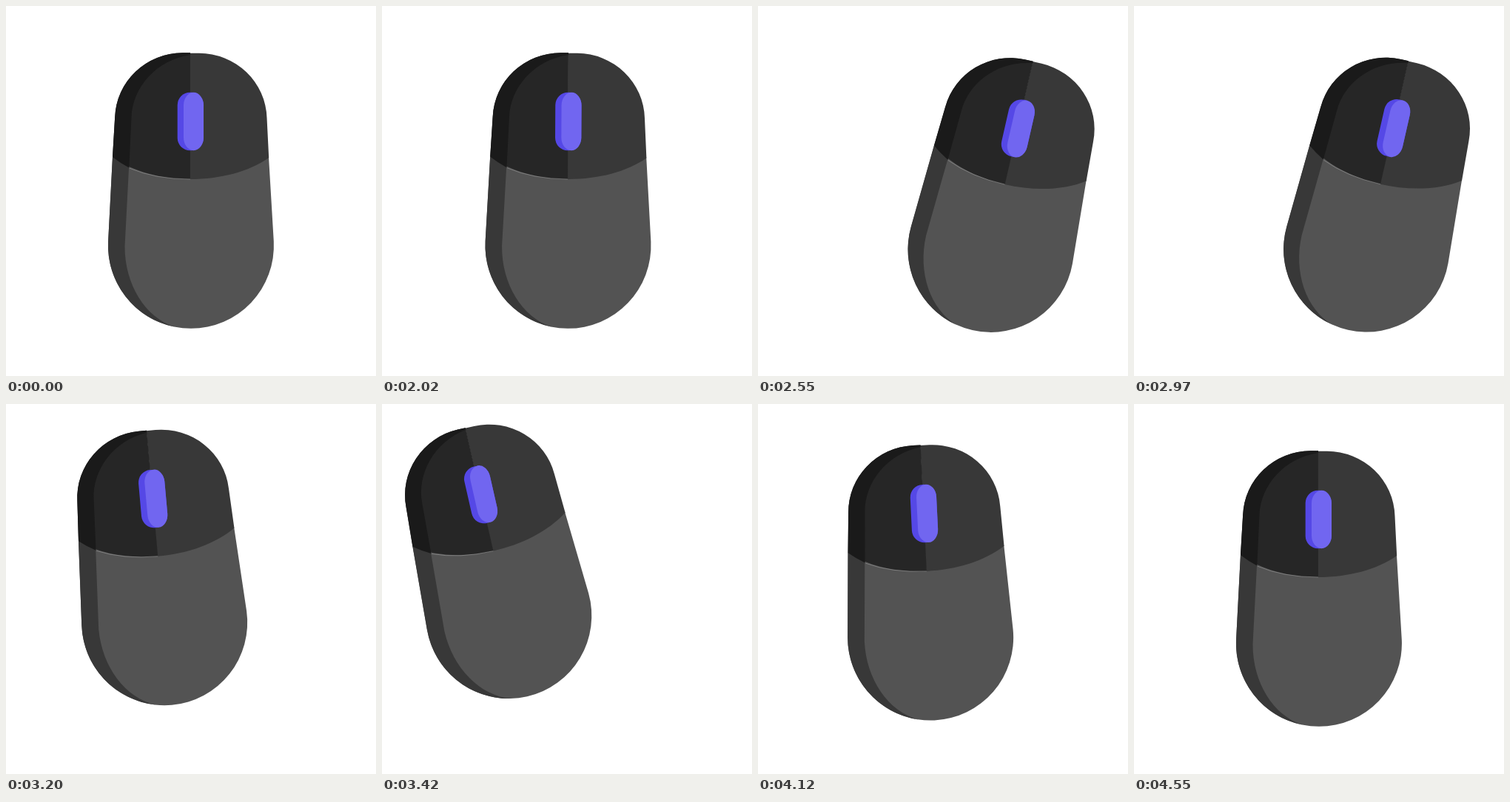
Write an HTML page that moves like this. It is 500x500 px and loops after 4.57 s.

```html
<!DOCTYPE html>
<html lang="en">
<head>
<meta charset="utf-8">
<title>Computer mouse</title>
<style>
  html, body { margin: 0; width: 100%; height: 100%; overflow: hidden; background: #fff; }
  svg { display: block; width: 100%; height: 100%; }
</style>
</head>
<body>
<svg viewBox="0 0 500 500">
  <g id="mouse">
    <path fill="#535353" d="M144 204 L138.1 318 A112 112 0 1 0 361.8 318 L355 204 L249 190 Z"/>
    <path fill="#383838" d="M144 204 L138.1 318 A112 112 0 0 0 228 433.7 C188 421 160.5 376 160.5 325 L166.5 210 Z"/>
    <path fill="#383838" d="M248.5 63.7 H261 A92 90 0 0 1 352.5 151 L355.2 205 C328 224 290 234 248.5 234 Z"/>
    <path fill="#262626" d="M249 63.3 H238.5 A92 90 0 0 0 147.2 150 L144 204 C172 224 210 234 249 234 Z"/>
    <path fill="#1a1a1a" d="M249 63.3 H238.5 A92 90 0 0 0 147.2 150 L144 204 Q154 212 166.3 218.6 L169.5 150 C171 110 203 73 249 66 Z"/>
    <path fill="none" stroke="#a8a8a8" stroke-width=".5" d="M167 219.2 Q202 234 249 234"/>
    <rect x="231.7" y="116.8" width="35.3" height="78.4" rx="17" fill="#5548e6"/>
    <rect x="240" y="116.8" width="27" height="78.4" rx="13.4" ry="17.5" fill="#7166f0"/>
  </g>
</svg>
<script>
  const LOOP = 4570;
  const mouse = document.getElementById('mouse');

  // Poses: shift x, shift y, angle about the bottom middle of the stage.
  const right = [25.7, 0.7, 13];
  const left = [-45.4, -46, -15.1];

  // Cubic bezier easing with handles (x1, 0) and (x2, 1).
  function ease(u, x1, x2) {
    if (u <= 0) return 0;
    if (u >= 1) return 1;
    let low = 0, high = 1, s;
    for (let i = 0; i < 24; i++) {
      s = (low + high) / 2;
      const r = 1 - s;
      const x = 3 * x1 * s * r * r + 3 * x2 * s * s * r + s ** 3;
      if (x < u) low = s; else high = s;
    }
    return s * s * (3 - 2 * s);
  }

  // Quick start with a long, slow settling.
  const settle = t => t <= 0 ? 0 : 1 / (1 + (92 / t) ** 2.52);

  function draw(t) {
    const toRight = settle(t - 2000);
    const toLeft = ease((t - 2941) / 789, 0.292, 0.074);
    const home = ease((t - 3852) / 590, 0.333, 0.04);
    const [x, y, angle] = right.map((r, i) =>
      r * toRight + (left[i] - r) * toLeft - left[i] * home);
    mouse.setAttribute('transform', `translate(${x} ${y}) rotate(${angle} 250 500)`);
  }

  let start;
  function tick() {
    const now = performance.now();
    start ??= now;
    draw((now - start) % LOOP);
    requestAnimationFrame(tick);
  }
  tick();
</script>
</body>
</html>
```
